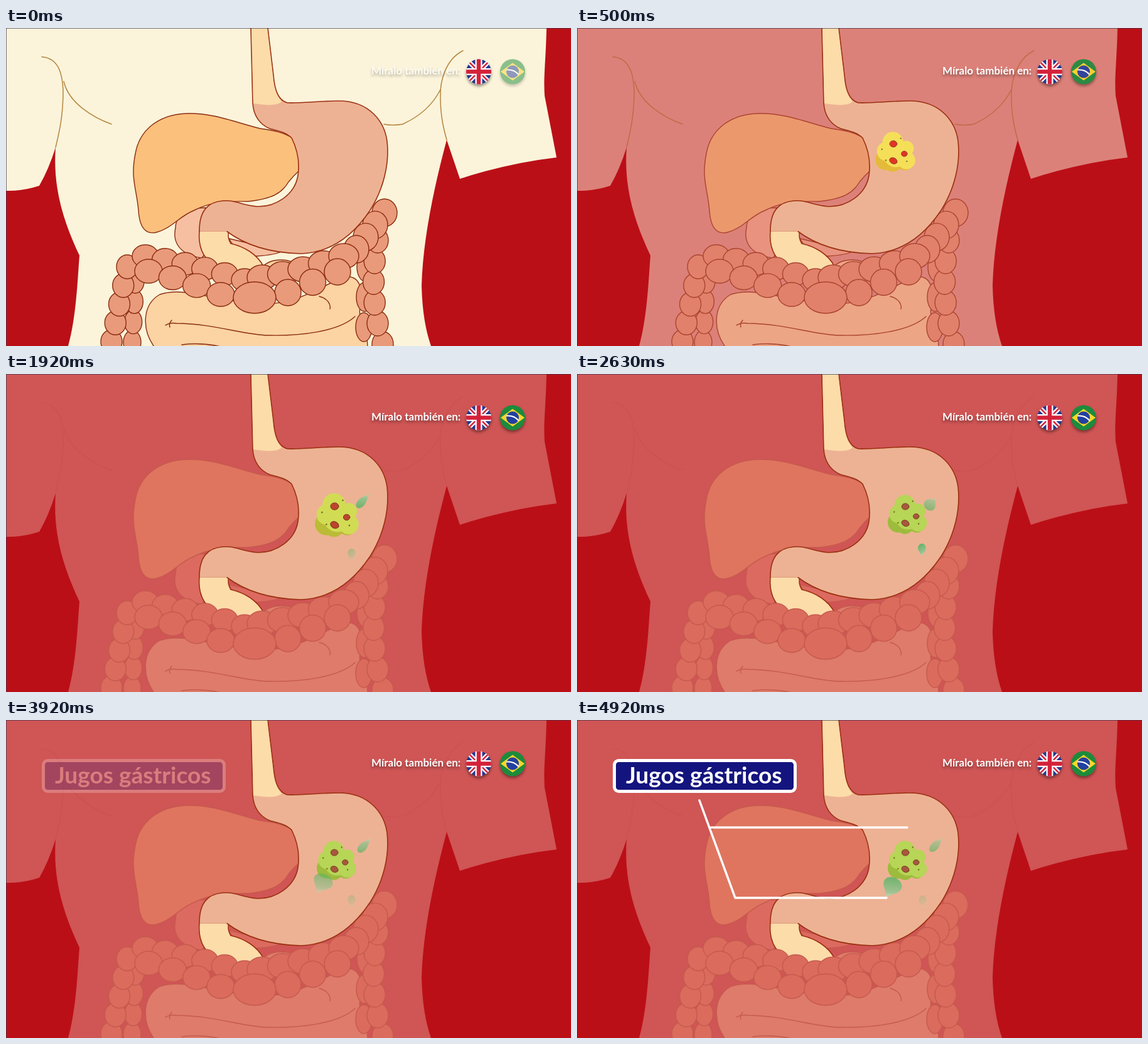
An HTML page that plays this animation: 900x506 px, repeating every 4960 ms.

```html
<!DOCTYPE html>
<html lang="es">
<head>
<meta charset="utf-8">
<title>Jugos gástricos</title>
<style>
html, body { margin: 0; width: 100%; height: 100%; overflow: hidden; background: #bb0f17; }
svg { display: block; width: 100%; height: 100%; --skin: 0%; --organ: 0%; }
path, ellipse { stroke-linecap: round; stroke-linejoin: round; }
.body { fill: color-mix(in srgb, #fbf4da, #d05555 var(--skin)); }
.crease { fill: none; stroke-width: 1.5; stroke: color-mix(in srgb, #b5853f, #cc5150 var(--organ)); }
.organ { stroke-width: 1.4; stroke: color-mix(in srgb, #8a2c10, #c65a4d var(--organ)); }
.liver { fill: color-mix(in srgb, #fbc07c, #df755f var(--organ)); }
.pancreas { fill: color-mix(in srgb, #f6bfa1, #dc6a60 var(--organ)); }
.bowel { fill: color-mix(in srgb, #fcd3a2, #de7b6b var(--organ)); }
.colon { fill: color-mix(in srgb, #e99a7a, #da6b5d var(--organ)); }
.line { fill: none; }
.edge { fill: none; stroke: #9a3010; stroke-width: 1.6; }
.tube { fill: #fcdca9; }
.stomach { fill: #edb294; }
text { font-family: Lato, sans-serif; font-weight: 700; fill: #fff; }
.shadow { filter: drop-shadow(0 3px 2px #0006); }
</style>
</head>
<body>
<svg id="scene" viewBox="0 0 900 506" preserveAspectRatio="none">
  <defs>
    <clipPath id="disc"><circle r="20"/></clipPath>
    <linearGradient id="juice" x2=".35" y2="1">
      <stop stop-color="#e4f1dc" stop-opacity=".75"/>
      <stop offset=".4" stop-color="#8cc692" stop-opacity=".9"/>
      <stop offset="1" stop-color="#55b565" stop-opacity=".9"/>
    </linearGradient>
    <path id="drop" fill="url(#juice)" d="M0-20C4-10 14-3 14 6A14 14 0 0 1-14 6C-14-3-4-10 0-20Z"/>
  </defs>

  <rect width="900" height="506" fill="#bb0f17"/>
  <path class="body" d="M0 0H861C860 50 856 80 858 108L877 206Q800 215 723 240L702 178C680 260 664 340 662 410C663 450 668 480 677 506H99C112 460 114 400 117 362C95 315 74 260 79 190Q68 225 53 251Q25 260 0 259Z"/>
  <path class="crease" d="M57 46C85 48 90 75 91 100C91 140 85 165 79 190M92 85C100 120 140 143 168 153"/>
  <path class="crease" d="M728 36C700 50 691 85 692 110C692 140 697 160 702 178M692 98C680 122 660 140 632 153Q615 156 602 153"/>

  <path class="organ pancreas" d="M318 286C290 286 270 298 270 318C264 345 282 362 312 366L340 330ZM355 335Q370 362 400 363Q430 361 440 355Z"/>
  <path class="organ liver" d="M458 176C440 165 425 163 405 160C365 150 330 135 290 136C240 137 212 165 206 200C198 240 208 255 211 290C213 325 228 328 240 325C265 318 275 300 300 290C320 280 340 275 385 276C425 272 440 262 450 245Q458 235 466 228C468 210 464 190 458 176Z"/>
  <path class="organ bowel" d="M405 385Q415 369 438 369Q455 369 464 378L455 390Z"/>
  <path class="organ bowel" d="M238 510C215 480 217 440 245 424C280 412 320 430 400 440C470 440 500 410 540 396C570 392 568 430 564 445C560 465 576 470 576 510Z"/>
  <path class="organ line" d="M254 473Q262 468 272 470C330 470 385 490 420 489C470 490 530 483 556 459M264 465Q259 470 261 476M499 427C512 430 518 440 516 447M280 504Q310 500 342 507"/>

  <path class="tube edge" style="fill:#fcdca9" d="M308 322C306 345 312 365 331 377L375 392L410 379C400 360 380 348 358 343Q352 333 355 322Z"/>
  <g id="colon"></g>

  <path class="edge" style="fill:#edb294" d="M417 0L426 75C428 100 434 115 448 119C470 120 500 116 530 116C580 116 603 150 607 180C611 215 602 255 580 290C560 320 525 357 470 359C420 358 380 345 351 323H308C308 290 322 277 345 275C365 273 375 282 400 284C430 285 460 265 465 235C468 215 465 195 455 175C445 165 430 163 420 160C405 154 394 140 393 119L390 0"/>
  <path stroke="#edb294" stroke-width="2.6" d="M310 322.5H351"/>
  <path class="tube" d="M391 0H416L425 75C427 100 432 108 439 117Q432 126 394 120Z"/>

  <g id="food">
    <g id="crust"><circle cx="-20" cy="14" r="21"/><circle cx="-6" cy="20" r="18"/><circle cx="18" cy="19" r="16"/></g>
    <g id="crumb">
      <circle cx="-6" cy="-21" r="21"/><circle cx="-19" cy="-3" r="19"/><circle cx="21" cy="-9" r="15"/>
      <circle cx="21" cy="15" r="18"/><circle cx="0" cy="4" r="25"/>
    </g>
    <g id="holes" stroke="#713019" stroke-width="1">
      <ellipse cx="-5" cy="-18" rx="7.5" ry="6.5"/><ellipse cx="17" cy="2" rx="6" ry="5.5"/>
      <ellipse cx="-5" cy="16" rx="8" ry="6" transform="rotate(25 -5 16)"/>
    </g>
    <path stroke="#6d6a1d" stroke-width="3" d="M10-29h0M-28-7h0M-20 15h0M22 17h0"/>
  </g>
  <g id="drops"></g>

  <path id="pointers" fill="none" stroke="#fff" stroke-width="3.5" d="M195 128L252 283H493M213 171H526"/>
  <g id="label">
    <rect x="59.5" y="64.5" width="288" height="49" rx="7" fill="#14147f" stroke="#fff" stroke-width="5"/>
    <text x="78" y="101" font-size="37">Jugos gástricos</text>
  </g>

  <text id="caption" class="shadow" x="582" y="74" font-size="17">Míralo también en:</text>
  <g class="shadow" transform="translate(753 69.5)"><g clip-path="url(#disc)">
    <circle r="20" fill="#25398e"/>
    <path d="M-20-20L20 20M20-20L-20 20" stroke="#fff" stroke-width="7"/>
    <path d="M-20-20L20 20M20-20L-20 20" stroke="#d4213a" stroke-width="2.5"/>
    <path d="M0-20V20M-20 0H20" stroke="#fff" stroke-width="11"/>
    <path d="M0-20V20M-20 0H20" stroke="#d4213a" stroke-width="6.5"/>
  </g></g>
  <g id="brazil" class="shadow" transform="translate(807 69.5)">
    <circle r="20" fill="#1d8b3c"/>
    <path d="M-19 0L0-14L19 0L0 14Z" fill="#f8d62b"/>
    <circle r="10" fill="#2340a0"/>
    <path d="M-9-3Q2-4 9 4" stroke="#fff" stroke-width="2" fill="none"/>
  </g>
  <path d="M0 .5H900M.5 0V506" stroke="#3c3550" stroke-opacity=".7"/>
</svg>
<script>
const LOOP = 4960, DROP_CYCLE = 984;
const $ = id => document.getElementById(id);
const clamp = v => Math.min(1, Math.max(0, v));
const ramp = (t, from, to) => clamp((t - from) / (to - from));
const mix = (a, b, p) => a + (b - a) * p;
const mixColor = (a, b, p) => `rgb(${a.map((v, i) => mix(v, b[i], p))})`;

// Piecewise linear motion through rows of [time, ...values].
function track(t, rows) {
  let i = 1;
  while (i < rows.length - 1 && t > rows[i][0]) i++;
  const [a, b] = [rows[i - 1], rows[i]], p = ramp(t, a[0], b[0]);
  return a.slice(1).map((v, k) => mix(v, b[k + 1], p));
}

// A run of colon lobes spread evenly along a line that bows sideways.
function lobes(count, x1, y1, x2, y2, rx, ry, bowX = 0, bowY = 0) {
  for (let i = 0; i < count; i++) {
    const p = count > 1 ? i / (count - 1) : 0, bow = 4 * p * (1 - p);
    $('colon').insertAdjacentHTML('beforeend', `<ellipse class="organ colon" rx="${rx}" ry="${ry}"
      cx="${mix(x1, x2, p) + bow * bowX}" cy="${mix(y1, y2, p) + bow * bowY}"/>`);
  }
}
lobes(4, 201, 500, 206, 403, 14, 19);
lobes(5, 168, 499, 193, 380, 17, 19);
lobes(3, 570, 476, 572, 380, 13, 23);
lobes(6, 600, 503, 592, 338, 17, 20, -10);
lobes(4, 603, 294, 558, 352, 20, 22);
lobes(6, 222, 363, 380, 401, 21, 18, 0, -3);
lobes(5, 408, 397, 538, 363, 24, 20, 0, 4);
lobes(4, 227, 387, 342, 424, 22, 19, 0, -2);
lobes(3, 449, 421, 528, 388, 21, 21);
lobes(1, 396, 429, 396, 429, 34, 25);

// Each drop leaves the food with its tip pointing outwards.
const easeOut = u => 1 - (1 - u) ** 2;
const drops = [
  { start: 600, life: 450, from: [528, 184], to: [528, 145], turn: 0, wide: [1.2, .75], tall: [1, .92], ease: easeOut },
  { start: 520, life: 300, from: [507, 252], to: [479, 317], turn: 207, wide: [1.2, .75], tall: [.75, 1.2], ease: easeOut },
  { start: 190, life: 500, from: [564, 206], to: [593, 178], turn: 42, wide: [.75, .45], tall: [.55, .75], ease: u => u ** 4 },
  { start: 860, life: 750, from: [548, 270], to: [551, 291], turn: 180, wide: [.65, .45], tall: [.75, .5], ease: u => u }
];
$('drops').innerHTML = drops.map(() => '<use href="#drop"/>').join('');
const dropNodes = [...$('drops').children];

function drawDrop(drop, node, t) {
  const phase = t - 3380 + 5 * DROP_CYCLE - drop.start;
  const u = phase % DROP_CYCLE / drop.life;
  node.style.opacity = t < 620 || u > 1 ? 0 : Math.min(1, .3 + u * 5, (1 - u) * 2.6) * .95;
  const e = drop.ease(u), [x, y] = drop.from.map((v, i) => mix(v, drop.to[i], e));
  const s = Math.min(1, u * 2);
  node.setAttribute('transform',
    `translate(${x} ${y}) rotate(${drop.turn}) scale(${mix(...drop.wide, s)} ${mix(...drop.tall, s)})`);
}

function draw(t) {
  const fade = ramp(t, 0, 690);
  $('scene').style.setProperty('--skin', fade * 100 + '%');
  $('scene').style.setProperty('--organ', fade * fade * 100 + '%');
  $('caption').style.opacity = mix(.7, 1, ramp(t, 0, 250));
  $('brazil').style.opacity = mix(.5, 1, ramp(t, 0, 600));

  const [x, y, size, alpha] = track(t, [
    [0, 408, -30, .3, .4], [150, 424, 80, .4, .6], [290, 478, 157, .5, .75],
    [650, 529, 228, 1, 1], [1100, 529, 228, 1, 1], [2500, 527, 225, .78, 1]
  ]);
  $('food').setAttribute('transform', `translate(${x} ${y}) scale(${size})`);
  $('food').style.opacity = alpha;
  const digested = ramp(t, 1100, 2500);
  $('crust').style.fill = mixColor([227, 187, 48], [157, 187, 60], digested);
  $('crumb').style.fill = mixColor([246, 229, 82], [183, 213, 86], digested);
  $('holes').style.fill = mixColor([224, 38, 26], [166, 88, 62], digested);

  drops.forEach((drop, i) => drawDrop(drop, dropNodes[i], t));

  $('label').style.opacity = ramp(t, 3850, 4150);
  $('pointers').style.opacity = ramp(t, 4170, 4420);
}

function tick() {
  draw(performance.now() % LOOP);
  requestAnimationFrame(tick);
}
tick();
</script>
</body>
</html>
```
